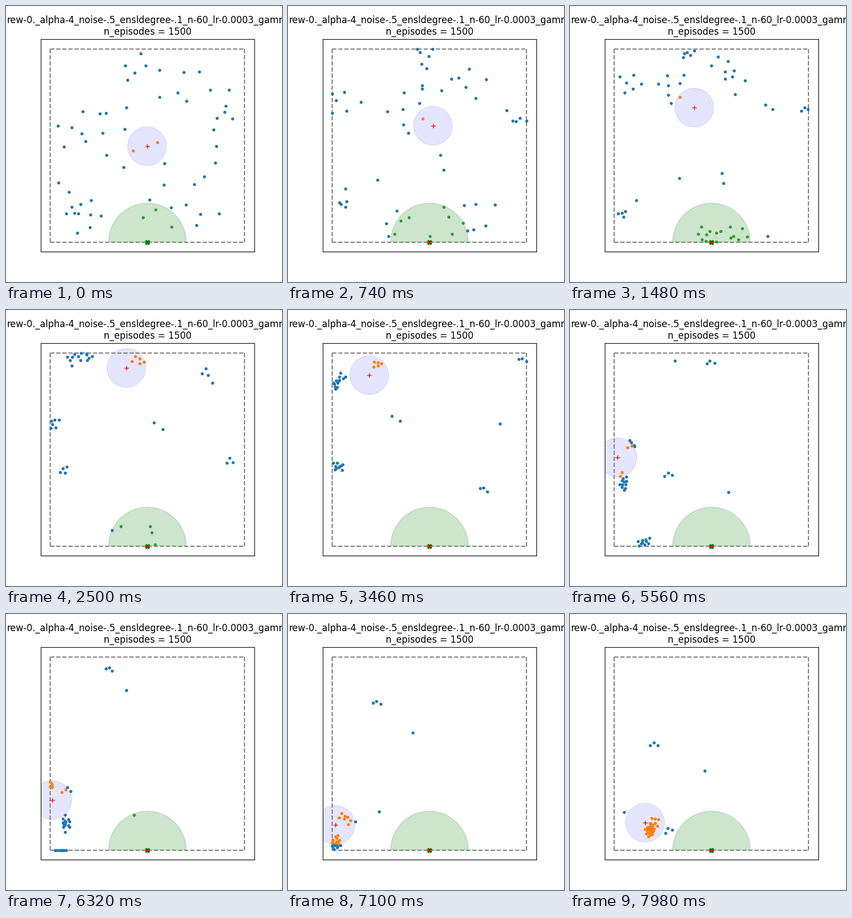
These frames come from a looping animation (500x500 px, 8 s). A matplotlib script:

```python
import numpy as np
import matplotlib.pyplot as plt
from matplotlib.animation import FuncAnimation
from matplotlib.patches import Ellipse, Wedge

FRAMES, INTERVAL = 400, 20
LEFT, RIGHT, TOP, BOTTOM = 80.1, 432.4, 77.5, 427.5
CORNER, SIZE = np.array([LEFT, TOP]), np.array([RIGHT - LEFT, BOTTOM - TOP])
EXIT = np.array([256.25, BOTTOM])
EXIT_RADIUS, LEADER_RADIUS = 70.2, 35.1
SPEED = 1.76                                 # pixels per frame
KEYS = [0, 74, 125, 173, 278, 355, 399]      # frames at which flocks have a place
GOLDEN = np.pi * (3 - np.sqrt(5))

rng = np.random.default_rng(4)
dots = []


def fold(points):
    """Reflect points at the walls."""
    inner = np.abs(points - CORNER)
    return CORNER + SIZE - np.abs(SIZE - inner)


def bridge(n, sigma):
    """Random walk of n steps that starts and ends at zero."""
    walk = np.cumsum(rng.normal(0, sigma, (n, 2)), axis=0)
    u = np.arange(n)[:, None] / n
    return walk - walk[0] - u * (walk[-1] - walk[0])


def track(keys, points, sides=None):
    """Smooth noisy path through the points; NaN after the last key."""
    points = np.asarray(points, float)
    path = np.full((max(FRAMES, keys[-1] + 1), 2), np.nan)
    slopes = np.gradient(points, keys, axis=0)
    for i in range(len(keys) - 1):
        a, b, n = points[i], points[i + 1], keys[i + 1] - keys[i]
        u = np.arange(n)[:, None] / n
        leg = ((1 + 2 * u) * (1 - u) ** 2 * a + u * u * (3 - 2 * u) * b
               + n * u * (1 - u) * ((1 - u) * slopes[i] - u * slopes[i + 1]))
        if sides is not None:
            # bow the leg so that the dot keeps its speed on short hops
            chord = b - a
            d = max(np.hypot(*chord), 1)
            bow = min(0.32 * np.sqrt(max((SPEED * n) ** 2 - d * d, 0)), 26)
            normal = np.array([-chord[1], chord[0]]) / d
            leg = leg + sides[i] * bow * np.sin(np.pi * u) ** 2 * normal
        path[keys[i]:keys[i + 1]] = leg + bridge(n, 0.3)
    path[keys[-1]] = points[-1]
    return np.clip(path[:FRAMES], CORNER, CORNER + SIZE)


def flock(count, spread, *places):
    """Dots that gather while they travel; a short route ends at the exit."""
    index = np.arange(count)
    reach = np.sqrt((index + 0.5) / count)
    angle = rng.uniform(0, 2 * np.pi) + GOLDEN * index
    poses = []
    for k, place in enumerate(places):
        radius = max(spread * 0.5 ** k, min(spread, 9))
        turn = angle + rng.normal(0, 0.3, count)
        offset = radius * reach * np.array([np.cos(turn), np.sin(turn)])
        poses.append(fold(np.array(place) + offset.T))
    sides = rng.choice([-1, 1], len(KEYS))
    for dot in range(count):
        points = [pose[dot] for pose in poses]
        keys = KEYS[:len(points)]
        if len(points) < len(KEYS):
            way = np.hypot(*(EXIT - points[-1]))
            dots.append(track(keys + [keys[-1] + max(2, round(way / SPEED))],
                              points + [EXIT]))
        else:
            dots.append(track(keys, points, sides))


# dots that find the exit
flock(3, 24, (262, 373))
flock(6, 36, (145, 385), (243, 417))
flock(9, 64, (335, 348), (292, 413))
flock(2, 30, (275, 262), (272, 310), (262, 396))
flock(1, 0, (114, 337), (198, 312), (208, 392))
flock(1, 0, (95, 320), (120, 352), (192, 399))
flock(1, 0, (379, 284), (358, 417), (270, 425))

# upper flock: left along the top wall, down the left wall
flock(5, 30, (232, 112), (215, 85), (150, 84), (98, 122), (96, 302), (86, 412), (146, 388))
flock(8, 64, (190, 235), (186, 145), (124, 86), (86, 134), (97, 317), (84, 417), (143, 392))

# companions of the leader
flock(5, 50, (310, 130), (280, 105), (240, 91), (161, 97), (109, 242), (100, 367), (153, 374))

# left wall, then the lower left corner
flock(6, 50, (132, 215), (108, 135), (87, 205), (88, 281), (130, 421), (87, 417), (144, 395))
flock(4, 18, (122, 370), (94, 378), (104, 290), (94, 286), (138, 419), (88, 409), (146, 390))

# small groups from the right
flock(3, 45, (368, 170), (301, 134), (364, 110), (426, 91), (256, 94), (162, 161), (153, 236))
flock(3, 18, (398, 199), (427, 187), (406, 272), (356, 325), (179, 298), (116, 377), (179, 391))
flock(1, 0, (376, 224), (299, 160), (374, 132), (384, 206), (287, 330), (165, 358), (98, 359))
flock(1, 0, (404, 152), (354, 179), (268, 204), (188, 192), (117, 247), (93, 369), (158, 384))
flock(1, 0, (381, 254), (367, 187), (284, 216), (203, 201), (190, 92), (226, 215), (244, 284))

dots = np.array(dots)
leader = track(
    [0, 25, 74, 100, 125, 146, 173, 205, 235, 278, 355, 372, 399],
    [(255.5, 254), (268, 228), (225, 184), (211, 146), (218, 105), (188, 100),
     (147, 118), (108, 156), (90, 204), (86, 267), (86, 382), (95, 373), (136, 378)])

fig, ax = plt.subplots(figsize=(5, 5), dpi=100)
ax.set(xlim=(62.5, 450), ylim=(445, 60), xticks=[], yticks=[])
ax.set_title("rew-0._alpha-4_noise-.5_ensldegree-.1_n-60_lr-0.0003_gamm\n"
             "n_episodes = 1500", fontsize=12)

for y in (BOTTOM, TOP):
    ax.plot((LEFT, RIGHT), (y, y), "--", color="gray", lw=1.5)
for x in (LEFT, RIGHT):
    ax.plot((x, x), (BOTTOM, TOP), "--", color="gray", lw=1.5)
ax.add_patch(Wedge(EXIT, EXIT_RADIUS, 180, 360, color="green", alpha=0.2))
halo = ax.add_patch(Ellipse((0, 0), 2 * LEADER_RADIUS, 2 * LEADER_RADIUS,
                            color="blue", alpha=0.1))


def marks(style, color):
    return ax.plot([], [], style, color=color, ms=6)[0]


free, following, leaving = (marks(".", c) for c in ("C0", "C1", "C2"))
ax.plot(*EXIT, "X", color="green", ms=6)
gone = marks(".", "red")
cross = marks("+", "red")


def near(points, center, radius):
    return np.hypot(*(points - center).T) < radius


def draw(frame):
    here = dots[:, frame]
    out = np.isnan(here[:, 0])
    here = here[~out]
    green = near(here, EXIT, EXIT_RADIUS)
    orange = near(here, leader[frame], LEADER_RADIUS) & ~green
    free.set_data(*here[~green & ~orange].T)
    following.set_data(*here[orange].T)
    leaving.set_data(*here[green].T)
    gone.set_data(*(EXIT[:, None] if out.any() else np.empty((2, 0))))
    halo.center = leader[frame]
    cross.set_data(*leader[frame][:, None])
    return halo, free, following, leaving, gone, cross


anim = FuncAnimation(fig, draw, frames=FRAMES, interval=INTERVAL,
                     repeat=True, repeat_delay=0)
plt.show()
```
